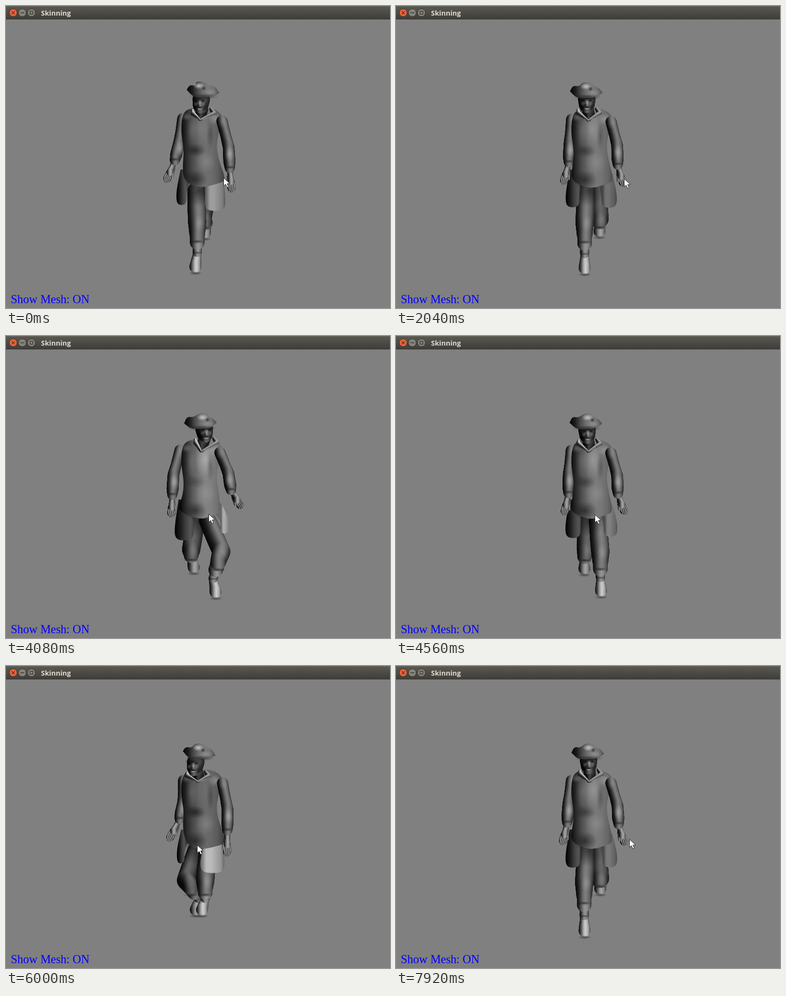
These frames come from a looping animation (800x628 px, 8 s). An HTML page with a canvas:

```html
<!DOCTYPE html>
<html lang="en">
<head>
<meta charset="utf-8">
<title>Skinning</title>
<style>
  html, body { margin: 0; width: 100%; height: 100%; overflow: hidden; background: #808080; }
  canvas { position: absolute; left: 0; top: 0; }
  #bar { position: absolute; width: 800px; height: 28px; box-sizing: border-box;
    background: linear-gradient(#5a5851, #3d3c38); border-top: 1px solid #6b6960; }
  #bar b { position: absolute; left: 73px; top: 4px; color: #dfdbd2;
    font: bold 14.4px/20px "Open Sans", sans-serif; }
  #bar svg { position: absolute; left: 0; top: -1px; }
  #status { position: absolute; left: 10px; top: 596px; color: #00f; white-space: nowrap;
    font: 24.4px/28px "Liberation Serif", serif; }
</style>
</head>
<body>
<canvas id="stage" width="800" height="628"></canvas>
<div id="bar">
  <svg width="70" height="28" fill="none" stroke="#3a3935">
    <circle cx="15" cy="14" r="8" fill="#ee6138"/>
    <circle cx="34" cy="14" r="8" fill="#86837a"/>
    <circle cx="53" cy="14" r="8" fill="#86837a"/>
    <path d="M12 11l6 6m0-6l-6 6M30 14h8M50 11h6v6h-6z" stroke-width="1.4"/>
  </svg>
  <b>Skinning</b>
</div>
<div id="status">Show Mesh: ON</div>
<script>
const g = document.getElementById('stage').getContext('2d');
const LOOP = 8000, STEP = 120;

// Bursts of movement: [start time, number of steps]
const bursts = [[240, 1], [720, 2], [1200, 10], [2520, 4], [3120, 25], [6360, 14]];
// [step, walk phase in cycles, yaw, pointer x, pointer y]
const keys = [
  [0, .2, -.6, 415, 357],
  [11, 1.02, 0, 475, 359],
  [19, 1.34, .4, 473, 360],
  [26, 1.45, .8, 422, 370],
  [36, 2.23, -.7, 401, 373],
  [42, 2.85, -1, 398, 372],
  [56, 3.1, .1, 486, 360],
];

const mix = (a, b, k) => a.map((v, i) => v + (b[i] - v) * k);
const wave = cycles => Math.cos(cycles * 2 * Math.PI);
const grey = v => `rgb(${v},${v},${v})`;

function stepAt(t) {
  return bursts.reduce((sum, [start, n]) =>
    sum + Math.max(0, Math.min(n, Math.floor((t - start) / STEP) + 1)), 0);
}

function stateAt(step) {
  let i = 0;
  while (i < keys.length - 2 && keys[i + 1][0] <= step) i++;
  const [a, b] = [keys[i], keys[i + 1]];
  return mix(a, b, (step - a[0]) / (b[0] - a[0]));
}

// Horizontal gradient of evenly spaced greys
function ramp(x0, x1, ...shades) {
  const fill = g.createLinearGradient(x0, 0, x1, 0);
  shades.forEach((v, i) => fill.addColorStop(i / (shades.length - 1), grey(v)));
  return fill;
}

// Closed curve through the midpoints of its control points
function blob(points, fill) {
  g.beginPath();
  points.forEach(([x, y], i) => {
    const [nx, ny] = points[(i + 1) % points.length];
    if (!i) {
      const [lx, ly] = points[points.length - 1];
      g.moveTo((x + lx) / 2, (y + ly) / 2);
    }
    g.quadraticCurveTo(x, y, (x + nx) / 2, (y + ny) / 2);
  });
  g.fillStyle = fill;
  g.fill();
}

// Round tapered chain of [x, y, radius], lit from the right
function limb(points, high) {
  const shades = [.06, .25, .55, .85, 1, .9, .72, .35].map(v => v * high);
  for (let i = 0; i < points.length - 1; i++) {
    for (let k = 0; k <= 1; k += .04) {
      const [x, y, r] = mix(points[i], points[i + 1], k);
      g.fillStyle = ramp(x - r, x + r, ...shades);
      g.beginPath();
      g.arc(x, y, r, 0, 7);
      g.fill();
    }
  }
}

// Soft elliptical highlight or shadow
function glow(x, y, rx, ry, v, alpha) {
  g.save();
  g.translate(x, y);
  g.scale(rx, ry);
  const fill = g.createRadialGradient(0, 0, 0, 0, 0, 1);
  fill.addColorStop(0, `rgba(${v},${v},${v},${alpha})`);
  fill.addColorStop(1, `rgba(${v},${v},${v},0)`);
  g.fillStyle = fill;
  g.fillRect(-1, -1, 2, 2);
  g.restore();
}

// side is -1 for the left of the picture, 1 for the right
function legPose(side, phase, yaw) {
  const q = side < 0 ? phase : phase + .5;
  const reach = wave(q - .1), bend = Math.max(0, wave(q - .85));
  const x = 408.5 + side * (15.5 + 9 * yaw), y = 508 + 44 * reach;
  return {
    hip: [408 + side * 12, 384],
    knee: [x + 27 * yaw * bend, 446 + 4 * reach],
    ankle: [x, y - 24 - 8 * reach],
    toe: [x + 7 * yaw, y],
  };
}

function leg({ hip, knee, ankle, toe }, light) {
  const hem = mix(knee, ankle, .68), band = mix(knee, ankle, .42);
  limb([[...ankle, 8], [...toe, 12.5]], 205 * light);
  glow(toe[0], toe[1] + 12, 14, 4, 10, .5);
  limb([[...hem, 9], [...ankle, 9.5]], 150 * light);
  glow(...ankle, 11, 3, 10, .5);
  limb([[...band, 15], [...hem, 15]], 150 * light);
  limb([[...hip, 18], [...mix(hip, knee, .6), 19], [...knee, 19], [...band, 16]], 128 * light);
  glow(band[0], band[1] + 14, 17, 4, 10, .55);
  glow(knee[0] + 5, knee[1] + 2, 11, 18, 190, .3 * light);
}

function hand(wrist, tip, side) {
  const [dx, dy] = [tip[0] - wrist[0], tip[1] - wrist[1]], d = Math.hypot(dx, dy);
  const at = (k, n) => [wrist[0] + dx * k - dy / d * n, wrist[1] + dy * k + dx / d * n];
  for (let n = -1.5; n <= 1.5; n++) {
    limb([[...at(.5, n * 3), 2.8], [...at(.8, n * 4), 2.3], [...at(1 - Math.abs(n) * .06, n * 3), 1.6]], 150);
  }
  limb([[...at(.3, side * 4), 3], [...at(.7, side * 9), 2]], 160);
  limb([[...wrist, 6], [...at(.3, 0), 5.5], [...at(.54, 0), 7]], 165);
}

function arm(shoulder, wrist, bend) {
  const elbow = mix(shoulder, wrist, .55);
  elbow[0] += bend;
  const cuff = mix(elbow, wrist, .65);
  limb([[...shoulder, 11.5], [...mix(shoulder, elbow, .6), 11], [...elbow, 12], [...cuff, 12.5], [...wrist, 10]], 125);
  glow(shoulder[0] + 2, shoulder[1] + 2, 10, 13, 170, .3);
  glow(elbow[0] + 2, elbow[1] + 14, 9, 17, 215, .45);
  glow(wrist[0], wrist[1] - 3, 12, 4, 10, .55);
}

function flap(x, y, w, topX, topY, topW, fill) {
  const h = w / 2 + 2;
  blob([[topX - topW, topY], [topX - topW, topY], [x - h, y - 28], [x - h, y - 6], [x - h * .6, y + 2],
    [x + h * .4, y + 3], [x + h, y - 3], [x + h, y - 28], [topX + topW, topY], [topX + topW, topY]], fill);
}

function torso(yaw, dy) {
  const light = 1 + .12 * yaw, left = 364 - 9 * yaw, right = 449 - 8 * yaw;
  const outline = [[388, 211], [368, 221], [364, 260], [371, 300], [368, 330], [left, 358], [384, 372],
    [410, 378], [right - 8, 368], [right + 5, 362], [443, 320], [438, 288], [445, 255], [456, 234], [434, 211]];
  blob(outline.map(([x, y]) => [x, y + dy]),
    ramp(363, 454, ...[5, 45, 82, 108, 120, 116, 102, 70].map(v => v * light)));
  glow(408 + yaw * 8, 254 + dy, 22, 36, 200, .34 + .25 * yaw);
  glow(386, 258 + dy, 12, 36, 170, .25);
  glow(426, 268 + dy, 8, 32, 20, .3);
  glow(394, 300 + dy, 22, 14, 10, .4 - .2 * yaw);
  glow(416, 324 + dy, 22, 22, 165, .35);
  glow(394, 360 + dy, 26, 20, 5, .5);
  glow(437, 234 + dy, 16, 13, 205, .4);
  glow(376, 230 + dy, 12, 9, 190, .3);
}

function head(x, y, yaw) {
  limb([[x, y - 8, 18], [x + yaw * 2, y + 4, 16], [x + yaw * 5, y + 12, 9]], 100);
  const f = x + yaw * 6;
  glow(f, y - 9, 17, 6, 5, .7);
  for (const side of [-1, 1]) {
    glow(f + side * 7, y - 5, 5, 3, 0, .8);
    glow(f + side * 8, y + 2, 5, 5, 150, .4);
  }
  glow(f + 1, y, 3, 8, 190, .7);
  glow(f - 3, y + 5, 4, 4, 0, .6);
  glow(f, y + 9, 8, 2.5, 5, .9);
  glow(f, y + 12, 6, 2, 200, .7);
}

function hat(x, y, yaw) {
  const peak = x + 8 * Math.sin(3 * yaw), tilt = 3 * yaw;
  const tipL = [x - 34, y + 17 + tilt], tipR = [x + 34, y + 20 - tilt];
  blob([tipL, tipL, [x - 28, y + 5], [x - 15, y + 7], [peak - 8, y - 2], [peak + 8, y - 2], [x + 18, y + 7],
    [x + 26, y + 9], tipR, tipR, [x + 22, y + 29], [x, y + 31], [x - 20, y + 31]],
    ramp(x - 34, x + 34, 5, 28, 75, 112, 122, 112, 75));
  glow(x + 2, y + 29, 30, 6, 0, .5);
  glow(x + 16, y + 20, 16, 7, 190, .3);
  glow(peak - 1, y + 7, 12, 7, 225, .75);
  glow(peak + 9, y + 12, 5, 5, 10, .6);
}

function figure(step, phase, yaw) {
  const drop = Math.min(4, step / 8), sway = wave(phase - .4);
  const legs = [-1, 1].map(side => legPose(side, phase, yaw));
  legs.sort((a, b) => a.toe[1] - b.toe[1]).forEach((pose, i) => leg(pose, i ? 1 : .8));
  glow(402, 384, 32, 34, 0, .55);

  const wristL = [354 - 8 * sway, 326 + 7 * yaw], wristR = [465 + 4 * sway, 331 - 12 * yaw];
  const tipL = [wristL[0] - 12 + 12 * yaw, wristL[1] + 46];
  const tipR = [wristR[0] + 13 + 14 * yaw, wristR[1] + 45 - 9 * yaw];

  const lx = 368 + 4 * yaw, lw = 25 + 13 * yaw, rx = 444 + 14 * yaw, rw = 28 - 18 * yaw;
  const shine = 112 + 75 * Math.abs(yaw);
  flap(lx, 416 + 8 * yaw, lw, 375 - yaw * 3, 340, 13,
    ramp(lx - lw / 2, lx + lw / 2 + 6, 5, 30, 62, 85, 60));
  flap(rx, 417 - 11 * yaw, rw, 433 - yaw * 3, 348, 18,
    ramp(rx - rw / 2, rx + rw / 2 + 4, ...[.6, 1, 1, .9, .8, .5].map(v => v * shine)));

  hand(wristL, tipL, -1);
  arm([366 - 4 * yaw, 234 + drop], wristL, -1 - 5 * yaw);
  torso(yaw, drop);
  hand(wristR, tipR, 1);
  arm([448 - 3 * yaw, 239 + drop], wristR, 5);

  const hatY = 159 + drop, faceX = 404 + 9 * sway, faceY = hatY + 41 - 3.5 * yaw;
  const notch = [403 + 4 * sway, 236 + drop];
  limb([[faceX + 2, faceY + 12, 12], [notch[0] + 2, notch[1] - 12, 12], [...notch, 3]], 65);
  limb([[faceX - 18, faceY + 15, 3], [faceX - 17, faceY + 22, 5], [...notch, 1.5]], 205);
  limb([[faceX + 20, faceY + 12, 3], [faceX + 27, faceY + 22, 5], [...notch, 1.5]], 170);
  head(faceX, faceY, yaw);
  hat(faceX - 1 - 8 * yaw, hatY, yaw);
}

function cursor(x, y) {
  g.save();
  g.translate(Math.round(x), Math.round(y));
  g.beginPath();
  [[.5, .5], [.5, 17], [4.5, 13.5], [7.5, 20], [10.5, 18.5], [7.5, 12.5], [13, 12]]
    .forEach(point => g.lineTo(...point));
  g.closePath();
  g.fillStyle = '#fff';
  g.strokeStyle = '#222';
  g.fill();
  g.stroke();
  g.restore();
}

let shown;
function frame() {
  const tick = Math.floor(performance.now() % LOOP / STEP), t = tick * STEP;
  if (tick !== shown) {
    shown = tick;
    const [step, phase, yaw, x, y] = stateAt(stepAt(t));
    g.clearRect(0, 0, 800, 628);
    figure(step, phase, yaw);
    cursor(t < 480 ? 453 : x, y);
  }
  requestAnimationFrame(frame);
}
frame();
</script>
</body>
</html>
```
